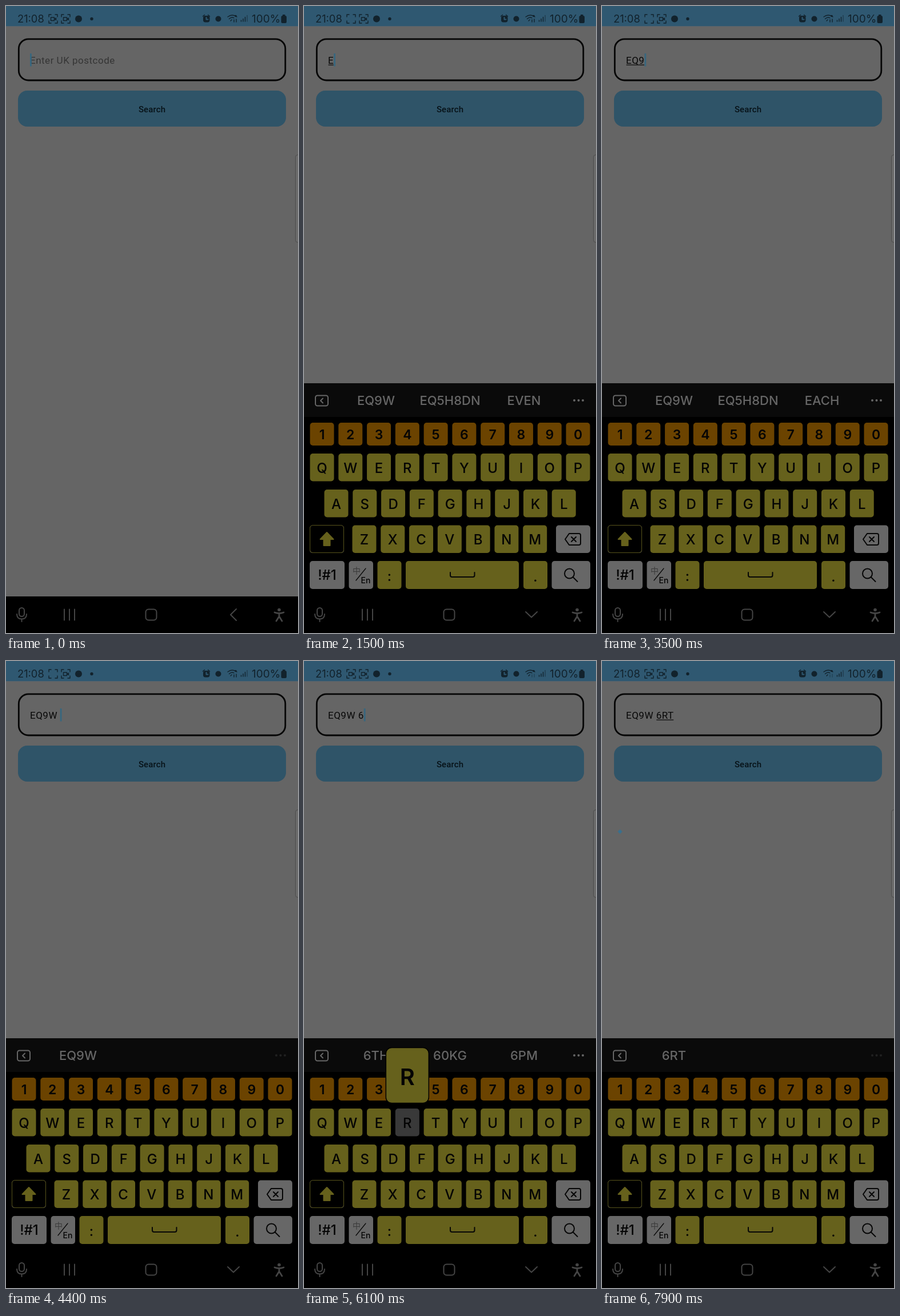
An HTML page that plays this animation: 511 by 1097 pixels, repeating every 8000 ms.

```html
<!DOCTYPE html>
<html lang="en">
<head>
<meta charset="utf-8">
<title>Postcode search</title>
<style>
html, body { margin: 0; width: 100%; height: 100%; overflow: hidden; background: #000; }
svg { display: block; width: 100vw; height: 100vh; }
text { font-family: Inter, sans-serif; white-space: pre; }
.form { font-family: Roboto, sans-serif; font-size: 17px; letter-spacing: .5px; }
.status { fill: #12222c; font-size: 18.3px; }
.key { font-size: 24px; font-weight: 500; text-anchor: middle; fill: #040404; }
.num { font-size: 23px; font-weight: 600; }
.hint { font-size: 22px; font-weight: 500; text-anchor: middle; fill: #666; }
.line { fill: none; stroke-width: 2; stroke-linecap: round; stroke-linejoin: round; }
.ink { stroke: #12222c; stroke-width: 1.4; }
.nav { stroke: #454545; }
.tool { stroke: #666; }
.dark { stroke: #060606; }
.off { visibility: hidden; }
</style>
</head>
<body>
<svg viewBox="0 0 511 1097" preserveAspectRatio="none">
  <defs>
    <clipPath id="btn"><rect x="21" y="148" width="469" height="63" rx="16"/></clipPath>
    <path id="frame" d="M0 4V0H4M11 0H15V4M15 11V15H11M4 15H0V11"/>
    <path id="lens" d="M3.5 5H9.5V10.5H3.5ZM10 7.5L12.5 6V9.5Z"/>
    <path id="arrow" d="M40 921L51.500 933H45.500V944H34.500V933H28.500Z"/>
  </defs>

  <rect width="511" height="1097" fill="#656565"/>
  <rect width="511" height="35" fill="#2f5871"/>
  <rect y="35" width="511" height="1" fill="#53636d"/>

  <!-- status bar -->
  <text class="status" x="20" y="29">21:08</text>
  <g class="line ink">
    <use href="#frame" x="75" y="15"/><use id="rec" href="#lens" x="75" y="15"/>
    <use href="#frame" x="97" y="15"/><use href="#lens" x="97" y="15"/>
    <path d="M388 19Q396 13 404 19M390.500 22.500Q395 18.500 399 21M393 26L395 24"/>
    <path d="M411.500 27V25M415 27V22.500M418.500 27V19.500"/>
    <path d="M422 27V16.500" opacity=".5"/>
    <path id="net" d="M399 24V28M403 23V28"/>
    <path d="M344.500 18L347.500 15.500M356.500 18L353.500 15.500"/>
  </g>
  <g fill="#12222c">
    <circle cx="127" cy="22.500" r="6"/><circle cx="150" cy="22.500" r="2.700"/>
    <rect x="345" y="17" width="11.500" height="11.500" rx="4"/>
    <circle cx="371.500" cy="22.500" r="5"/><circle cx="402" cy="17.500" r="1.800"/>
    <rect x="481.500" y="17" width="9.500" height="13" rx="2.500"/><rect x="484" y="15" width="4.500" height="3"/>
  </g>
  <path class="line" stroke="#2f5871" stroke-width="1.300" d="M350.500 20V23.500H353.500"/>
  <text class="status" x="430" y="29" style="font-size:19px">100%</text>

  <!-- form -->
  <rect x="22.300" y="57.800" width="466.500" height="72.200" rx="17" fill="none" stroke="#050505" stroke-width="2.800"/>
  <text id="label" class="form" x="42" y="101" fill="#353535">Enter UK postcode</text>
  <text id="value" class="form" x="42" y="101" fill="#080808"></text>
  <rect id="under" y="102.500" height="1.200" fill="#080808"/>
  <rect id="caret" y="83" width="2.800" height="22.500" fill="#37677f"/>
  <g clip-path="url(#btn)">
    <rect x="21" y="148" width="469" height="63" fill="#2f5468"/>
    <circle id="ripple" cx="255" cy="180" fill="#000"/>
  </g>
  <text class="form" x="255.500" y="185.500" text-anchor="middle" fill="#071218" style="font-size:15px;font-weight:500;letter-spacing:.1px">Search</text>
  <path id="loader" fill="#39708e" d="M0-4L4 0L0 4L-4 0Z"/>
  <rect x="506.500" y="260.500" width="12" height="153" rx="4" fill="#6a6a6a" stroke="#4b4b4b"/>

  <rect y="1033" width="511" height="64" fill="#000"/>

  <!-- keyboard -->
  <g id="board">
    <rect y="660" width="511" height="437" fill="#000"/>
    <rect y="660" width="511" height="59" fill="#0a0a0a"/>
    <g id="tools">
      <g id="discs" fill="#151515"></g>
      <g class="line tool">
        <rect x="26" y="680" width="20" height="14.500" rx="3"/>
        <path d="M30 698H45Q48.500 698 48.500 694.500V685"/>
        <path d="M30 685H42M30 688H42" stroke-dasharray=".1 3.900"/><path d="M33 691H39"/>
        <circle cx="187" cy="689.500" r="10.500"/><path d="M182 692Q187 698 192 692M183.500 686V687M190.500 686V687"/>
        <rect x="253" y="680" width="18" height="20" rx="3"/><path d="M258 680V684H266V680"/>
        <path d="M407 684V682Q407 679 410 679H419Q422 679 422 682V691Q422 694 419 694"/>
        <rect x="402" y="685" width="15" height="15" rx="3"/><path d="M406.500 696L409.500 689L412.500 696M407.500 694H411.500M413 682H417V686" stroke-width="1.500"/>
      </g>
      <path fill="#666" d="M110 679Q111 689 121 690Q111 691 110 701Q109 691 101 690Q109 689 110 679ZM118 679Q118.500 683 122 683.500Q118.500 684 118 688Q117.500 684 114 683.500Q117.500 683 118 679Z"/>
      <rect x="323.500" y="676.500" width="26" height="26" rx="7" fill="#5c5c5c"/>
      <circle cx="204" cy="673.500" r="4" fill="#784800"/>
    </g>
    <g id="bar">
      <g class="line tool"><rect x="20" y="681.500" width="22" height="18" rx="3.500"/><path d="M33 686.500L29 690.500L33 694.500"/></g>
      <text class="hint" x="126" y="698"></text>
      <text class="hint" x="255.500" y="698"></text>
      <text class="hint" x="385" y="698"></text>
    </g>
    <g id="dots" fill="#666"><circle cx="473" cy="690" r="2"/><circle cx="480.500" cy="690" r="2"/><circle cx="488" cy="690" r="2"/></g>
    <g id="keys"></g>
    <use id="shiftOff" class="line dark" href="#arrow"/>
    <g id="shiftOn">
      <rect x="10.500" y="908.500" width="59" height="48" rx="5" fill="#000" stroke="#57531b"/>
      <use href="#arrow" fill="#66611c" stroke="#66611c" stroke-width="2" stroke-linejoin="round"/>
    </g>
    <g class="line dark">
      <path d="M457 933L464 923H481Q484 923 484 926V940Q484 943 481 943H464ZM468 929L476 937M476 929L468 937"/>
      <path d="M256 991V996Q256 999 259 999H295.500Q298.500 999 298.500 996V991"/>
      <circle cx="464.500" cy="993" r="8.500"/><path d="M471 999.500L478.500 1007"/>
      <path d="M91 1005L108 984" stroke-width="1.200"/>
    </g>
    <text class="key" x="92" y="993" style="font:14px 'Noto Sans CJK SC','Noto Sans CJK',sans-serif;fill:#3a3a3a">中</text>
    <text class="key" x="108" y="1010" style="font-size:14px">En</text>
    <g id="popup"><rect width="75" height="97" rx="10" stroke="#000" stroke-width="1.500"/><text class="key" x="37.500" y="65" style="font-size:40px;font-weight:600"></text></g>
  </g>

  <!-- navigation bar -->
  <g class="line nav">
    <rect x="23" y="1053" width="9" height="15" rx="4.500"/><path d="M19 1064Q19 1072.500 27.500 1072.500Q36 1072.500 36 1064M27.500 1073V1077"/>
    <path d="M102 1055.500V1074.500M111 1055.500V1074.500M120 1055.500V1074.500"/>
    <rect x="244.500" y="1055.500" width="19" height="19" rx="5"/>
    <path id="back" d="M403 1055L393 1065L403 1075"/><path id="down" d="M388 1060L398 1069.500L408 1060"/>
    <path d="M470 1061Q478 1064 486 1061M478 1063V1069M478 1068L473 1076M478 1068L483 1076" stroke-width="2.800"/>
  </g>
  <circle cx="478" cy="1056.500" r="2.800" fill="#454545"/>
</svg>

<script>
const LOOP = 8000;
const YELLOW = '#66611c', ORANGE = '#6b4300', GREY = '#676767', DOWN = '#393939';
const $ = id => document.getElementById(id);
const show = (id, on) => $(id).classList.toggle('off', !on);

function add(parent, tag, attrs, text) {
  const el = document.createElementNS('http://www.w3.org/2000/svg', tag);
  for (const k in attrs) el.setAttribute(k, attrs[k]);
  if (text) el.textContent = text;
  return parent.appendChild(el);
}

const keys = {};
function key(name, x, y, w, h, fill, base, cls = '') {
  const rect = add($('keys'), 'rect', { x, y, width: w, height: h, rx: 5, fill });
  const label = add($('keys'), 'text', { class: 'key ' + cls, x: x + w / 2, y: base }, name.trim());
  keys[name] = { rect, label, x, y, w, fill };
}
function row(chars, x, y, h, fill, cls) {
  [...chars].forEach((c, i) => key(c, x + 49.78 * i, y, 42, h, fill, y + (cls ? 29 : 33.5), cls));
}
row('1234567890', 10.5, 729, 40, ORANGE, 'num');
row('QWERTYUIOP', 10.5, 783, 48.5, YELLOW);
row('ASDFGHJKL', 35.5, 846, 48.5, YELLOW);
row('ZXCVBNM', 84.5, 908.5, 48.5, YELLOW);
for (const x of [10, 441]) add($('keys'), 'rect', { x, y: 908.5, width: 60, height: 48.5, rx: 5, fill: GREY });
key('!#1', 10, 971, 61, 49, GREY, 1004);
key('', 78.5, 971, 42.5, 49, GREY, 1004);
key(':', 128.5, 971, 42, 49, YELLOW, 1006);
key(' ', 178, 971, 198, 49, YELLOW, 1004);
key('.', 384, 971, 42, 49, YELLOW, 1007);
key('', 433.5, 971, 67.5, 49, GREY, 1004);
for (let i = 0; i < 6; i++) add($('discs'), 'circle', { cx: 37 + 75 * i, cy: 690, r: 21 });

// [time, text, start of underlined part]
const typed = [[-100, '', 0], [1400, 'E', 0], [1900, 'EQ', 0], [3400, 'EQ9', 0], [3900, 'EQ9W', 0],
  [4400, 'EQ9W ', 5], [5700, 'EQ9W 6', 6], [6200, 'EQ9W 6R', 5], [6400, 'EQ9W 6RT', 5]];
// [time, suggestions, more available]
const hints = [[1400, ['EQ9W', 'EQ5H8DN', 'EVEN'], 1], [1900, ['EQ9W', 'EQ5H8DN', 'EACH'], 1],
  [3900, ['EQ9W'], 0], [4500, [], 1], [5700, ['6TH', '60KG', '6PM'], 1], [6400, ['6RT'], 0]];
// [key, down, up]
const presses = [['E', 1300, 1500], ['Q', 1800, 2000], ['9', 3300, 3500], ['W', 3700, 3900],
  [' ', 4200, 4400], ['6', 5500, 5700], ['R', 5900, 6200], ['T', 6300, 6500]];
const recOff = [[100, 900], [1400, 2400], [3400, 3900], [4300, 5300], [6400, 7300]];

const latest = (list, t) => list.filter(e => e[0] <= t).pop();

function drawForm(t) {
  const [since, text, from] = latest(typed, t);
  const value = $('value');
  if (value.textContent !== text) value.textContent = text;
  show('label', !text);
  const width = n => n ? value.getSubStringLength(0, n) : 0;
  const end = width(text.length), start = width(from);
  $('caret').setAttribute('x', 42 + end);
  show('caret', Math.floor((t - since) / 500) % 2 === 0);
  $('under').setAttribute('x', 42.5 + start);
  $('under').setAttribute('width', Math.max(0, end - start - 1));

  const p = (t - 7300) / 200;
  $('ripple').setAttribute('r', p > 0 ? 60 + 180 * Math.min(p, 1) : 0);
  $('ripple').setAttribute('opacity', p > 0 ? .08 * Math.max(0, Math.min(1, 2 - p)) : 0);
  $('loader').setAttribute('transform', `translate(31.5 298.5) scale(${t < 7900 ? .5 : 1})`);
  show('loader', t >= 7800);
}

function drawBoard(t) {
  const upper = t >= 400, hint = latest(hints, t);
  show('shiftOn', upper);
  show('shiftOff', !upper);
  show('tools', !hint);
  show('bar', hint);
  $('bar').querySelectorAll('text').forEach((el, i) => el.textContent = hint && hint[1][i] || '');
  $('dots').setAttribute('opacity', hint && !hint[2] ? .25 : 1);

  const press = presses.find(p => t >= p[1] && t < p[2]);
  for (const name in keys) {
    const k = keys[name];
    k.rect.setAttribute('fill', press && press[0] === name ? DOWN : k.fill);
    if (/^[A-Z]$/.test(name)) k.label.textContent = upper ? name : name.toLowerCase();
  }
  const pop = press && press[0] !== ' ';
  show('popup', pop);
  if (pop) {
    const k = keys[press[0]], [box, label] = $('popup').children;
    const x = Math.max(6, Math.min(430, k.x + k.w / 2 - 37.5));
    $('popup').setAttribute('transform', `translate(${x} ${k.y - 106.5})`);
    box.setAttribute('fill', k.fill);
    label.textContent = press[0];
  }
}

const origin = performance.now();
function draw() {
  const t = Math.floor((performance.now() - origin) % LOOP / 100) * 100;
  const open = t >= 100;
  $('board').style.display = open ? '' : 'none';
  show('back', !open);
  show('down', open);
  show('rec', !recOff.some(([a, b]) => t >= a && t < b));
  $('net').setAttribute('opacity', t >= 5900 ? .4 : 1);
  drawForm(t);
  drawBoard(t);
  requestAnimationFrame(draw);
}
draw();
</script>
</body>
</html>
```
